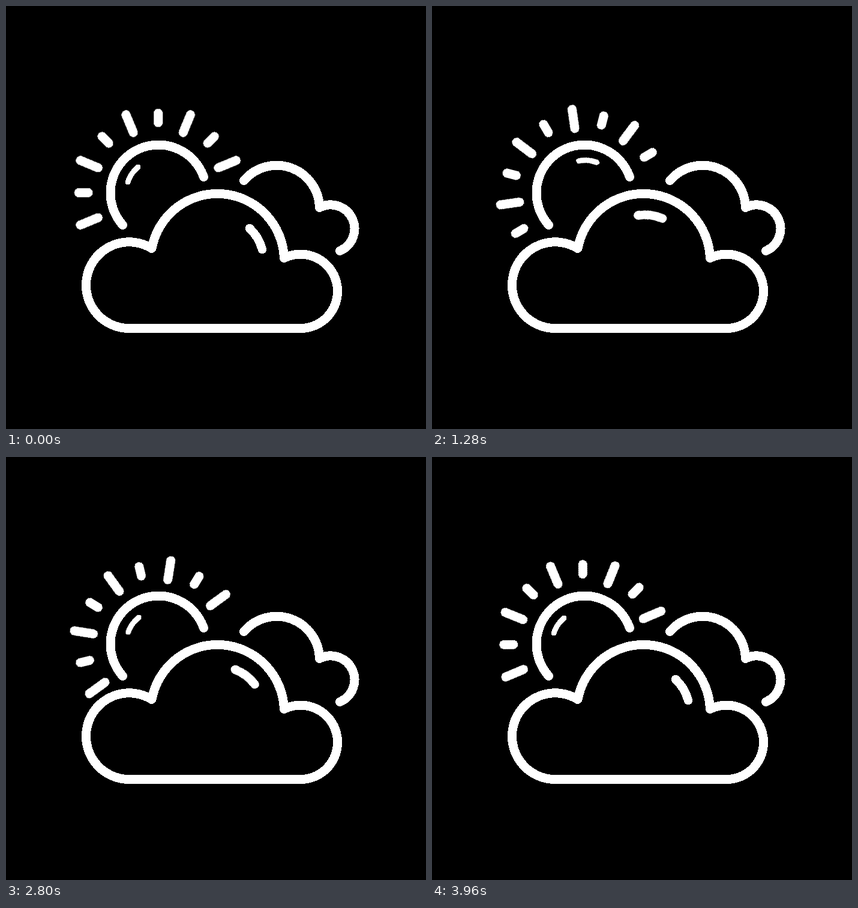
These frames come from a looping animation (700x704 px, 4000 ms). An HTML page without scripts:

```html
<!DOCTYPE html>
<html lang="en">
<head>
<meta charset="utf-8">
<title>Sun and clouds</title>
<style>
  html, body { margin: 0; width: 100%; height: 100%; overflow: hidden; background: #000; }
  svg { display: block; width: 100%; height: 100%; }
  .lines {
    fill: none; stroke: #fff; stroke-width: 15; stroke-linecap: round; stroke-linejoin: round;
    shape-rendering: crispEdges;
  }

  .rays { animation: turn 4s linear infinite; }
  @keyframes turn { to { transform: rotate(45deg); } }

  /* Nine rays show at a time: each half loop one leaves on the right, one enters on the left. */
  .in1, .in2, .out1, .out2 { animation: 4s step-end infinite; }
  .in1 { animation-name: in1; }
  .in2 { animation-name: in2; }
  .out1 { animation-name: out1; }
  .out2 { animation-name: out2; }
  @keyframes in1 { 0% { visibility: hidden; } 16.5%, 100% { visibility: visible; } }
  @keyframes in2 { 0% { visibility: hidden; } 66.5%, 100% { visibility: visible; } }
  @keyframes out1 { 0% { visibility: visible; } 16.5%, 100% { visibility: hidden; } }
  @keyframes out2 { 0% { visibility: visible; } 66.5%, 100% { visibility: hidden; } }

  .glint { animation: 4s cubic-bezier(.333, 0, .667, 1) infinite; }
  .sun-glint { stroke-width: 9; transform-origin: 254px 311px; animation-name: sun-glint; }
  .cloud-glint { stroke-width: 14.5; transform-origin: 352.5px 423.5px; animation-name: cloud-glint; }
  @keyframes sun-glint {
    0%, 75%, 100% { transform: rotate(0deg); }
    25% { transform: rotate(64deg); }
  }
  @keyframes cloud-glint {
    0%, 87.5%, 100% { transform: rotate(0deg); }
    43.75% { transform: rotate(-63deg); }
  }
</style>
</head>
<body>
<svg viewBox="0 0 700 704">
  <defs>
    <path id="long" d="M0-108.500V-140.500"/>
    <path id="short" d="M0-116.500V-132.500"/>
  </defs>
  <g class="lines">
    <!-- The ring of rays sits slightly off the point it turns about. -->
    <g transform="translate(252.3 309.3)">
      <g class="rays">
        <g transform="translate(1.4 1.5)">
          <use href="#long" class="in2" transform="rotate(-157.5)"/>
          <use href="#short" class="in1" transform="rotate(-135)"/>
          <use href="#long" transform="rotate(-112.5)"/>
          <use href="#short" transform="rotate(-90)"/>
          <use href="#long" transform="rotate(-67.5)"/>
          <use href="#short" transform="rotate(-45)"/>
          <use href="#long" transform="rotate(-22.5)"/>
          <use href="#short"/>
          <use href="#long" transform="rotate(22.5)"/>
          <use href="#short" class="out2" transform="rotate(45)"/>
          <use href="#long" class="out1" transform="rotate(67.5)"/>
        </g>
      </g>
    </g>

    <path d="M194.500 364.500A80 80 0 1 1 329.500 284.500"/>
    <path class="glint sun-glint" d="M203 293A54.400 54.400 0 0 1 220 268"/>

    <path d="M396.500 290.500A71.500 71.500 0 0 1 522.500 335.500A39.850 39.850 0 1 1 556.500 407.500"/>

    <path d="M205 536.500A71.850 71.850 0 1 1 243 403.500A111.200 111.200 0 0 1 463.500 419.500A61.700 61.700 0 1 1 491.500 536.500Z"/>
    <path class="glint cloud-glint" d="M406 370A76 76 0 0 1 427 405"/>
  </g>
</svg>
</body>
</html>
```
